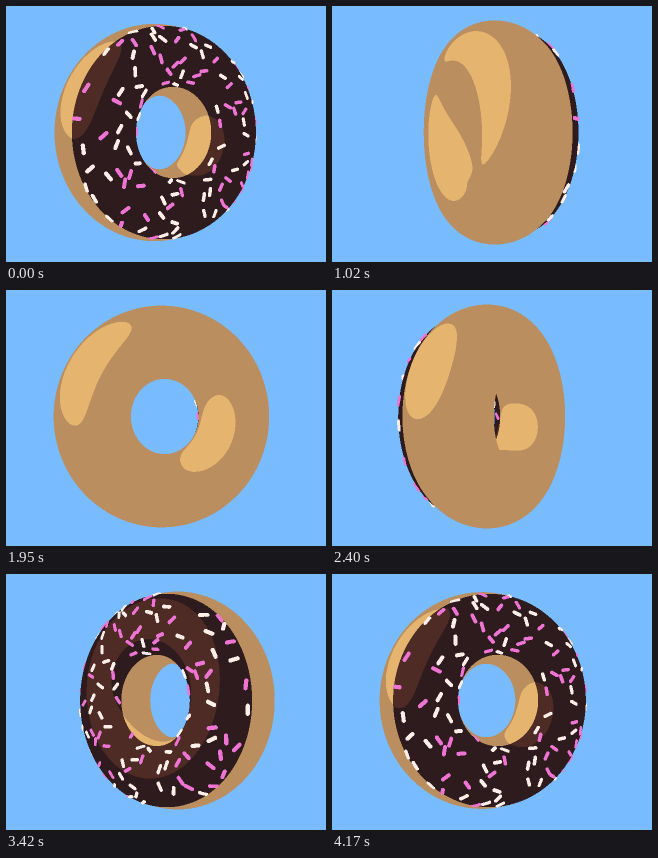
An HTML page with a canvas that plays this animation: 320 px wide and 256 px high, repeating every 4.23 s.

```html
<!DOCTYPE html>
<html lang="en">
<head>
<meta charset="utf-8">
<title>Spinning donut</title>
<style>
  html, body { margin: 0; width: 100%; height: 100%; overflow: hidden; background: #78bcff; }
  canvas { display: block; width: 320px; height: 256px; }
</style>
</head>
<body>
<canvas id="stage" width="320" height="256"></canvas>
<script>
const W = 320, H = 256, SS = 2;
const LOOP = 4230, STEP = 30, LAST_STEP = 139;
const CX = 159.5, CY = 126.5, DIST = 375;
const START = 31.5 * Math.PI / 180;

// Ring radius, dough cross-section, and the icing cap sitting on it.
const RING = 72.3, MID = -5;
const DOUGH = { r: 35, h: 40, base: 0 };
const ICING = { r: 28.6, h: 18.5, base: 23 };

// A nearby lamp, up and to the left; surfaces facing it closely enough are lit.
const LAMP = { x: -125, y: -95, z: 195 }, LIT = 0.775;

const rgb = (r, g, b) => ((255 << 24) | (b << 16) | (g << 8) | r) >>> 0;
const SKY = rgb(120, 188, 255);
const DOUGH_COLORS = [rgb(186, 142, 94), rgb(229, 181, 111)];
const ICING_COLORS = [rgb(46, 27, 29), rgb(78, 44, 37)];
const WHITE = rgb(255, 238, 231), PINK = rgb(238, 116, 212);

const BW = W * SS, BH = H * SS;
const buffer = document.createElement('canvas');
buffer.width = BW;
buffer.height = BH;
const bufferCtx = buffer.getContext('2d');
const image = bufferCtx.createImageData(BW, BH);
const pixels = new Uint32Array(image.data.buffer);
const near = new Float32Array(BW * BH);
const ctx = document.getElementById('stage').getContext('2d');

// Point on a ring-shaped surface: p runs round the ring, a round the cross-section.
function surface(shape, p, a) {
  const off = shape.r * Math.cos(a), rise = shape.base + shape.h * Math.sin(a);
  const rad = RING + off;
  const nr = off / DOUGH.r ** 2, nw = rise / DOUGH.h ** 2, len = Math.hypot(nr, nw);
  return {
    u: rad * Math.cos(p), v: rad * Math.sin(p), w: MID + rise,
    nu: nr / len * Math.cos(p), nv: nr / len * Math.sin(p), nw: nw / len, rad
  };
}

function makeStrip(shape, from, to, cols, colors) {
  const rows = 140, points = [];
  for (let i = 0; i <= rows; i++) {
    for (let j = 0; j <= cols; j++) {
      points.push(surface(shape, i / rows * 2 * Math.PI, from + (to - from) * j / cols));
    }
  }
  return { rows, cols, points, colors };
}

const lip = Math.asin(ICING.base / DOUGH.h);
const strips = [
  makeStrip(DOUGH, Math.PI - lip, 2 * Math.PI + lip, 44, DOUGH_COLORS),
  makeStrip(ICING, 0, Math.PI, 32, ICING_COLORS)
];

function seeded(seed) {
  return () => {
    seed = (seed + 0x6d2b79f5) | 0;
    let t = Math.imul(seed ^ (seed >>> 15), 1 | seed);
    t = (t + Math.imul(t ^ (t >>> 7), 61 | t)) ^ t;
    return ((t ^ (t >>> 14)) >>> 0) / 4294967296;
  };
}

// Scatters sprinkles evenly over the icing, each lying flat at a random slant.
function scatter(count, gap, half) {
  const random = seeded(7), list = [];
  while (list.length < count) {
    const p = random() * 2 * Math.PI, a = 0.1 + random() * (Math.PI - 0.2);
    const slant = random() * Math.PI, keep = random(), tint = random();
    const o = surface(ICING, p, a);
    const crowded = list.some(({ o: q }) => Math.hypot(o.u - q.u, o.v - q.v, o.w - q.w) < gap);
    if (crowded || keep > o.rad / (RING + ICING.r)) continue;
    const dp = half * Math.cos(slant) / o.rad;
    const da = half * Math.sin(slant) / Math.hypot(ICING.r * Math.sin(a), ICING.h * Math.cos(a));
    list.push({
      o,
      color: tint < 0.53 ? WHITE : PINK,
      ends: [surface(ICING, p - dp, a - da), surface(ICING, p + dp, a + da)]
    });
  }
  return list;
}
const sprinkles = scatter(112, 8, 3.1);

function triangle(a, b, c, colors) {
  const area = (b.x - a.x) * (c.y - a.y) - (b.y - a.y) * (c.x - a.x);
  if (Math.abs(area) < 1e-6) return;
  const x0 = Math.max(0, Math.ceil(Math.min(a.x, b.x, c.x)));
  const x1 = Math.min(BW - 1, Math.floor(Math.max(a.x, b.x, c.x)));
  const y0 = Math.max(0, Math.ceil(Math.min(a.y, b.y, c.y)));
  const y1 = Math.min(BH - 1, Math.floor(Math.max(a.y, b.y, c.y)));
  for (let y = y0; y <= y1; y++) {
    for (let x = x0; x <= x1; x++) {
      const q = ((x - a.x) * (c.y - a.y) - (y - a.y) * (c.x - a.x)) / area;
      const r = ((b.x - a.x) * (y - a.y) - (b.y - a.y) * (x - a.x)) / area;
      const p = 1 - q - r;
      if (p < -1e-5 || q < -1e-5 || r < -1e-5) continue;
      const k = p * a.k + q * b.k + r * c.k, at = y * BW + x;
      if (k <= near[at]) continue;
      near[at] = k;
      pixels[at] = colors[p * a.shade + q * b.shade + r * c.shade > LIT ? 1 : 0];
    }
  }
}

function ball({ x, y, z }, radius, color) {
  const k = DIST / (DIST - z), r = radius * k * SS;
  const cx = (CX + x * k) * SS - 0.5, cy = (CY + y * k) * SS - 0.5;
  for (let py = Math.ceil(cy - r); py <= cy + r; py++) {
    for (let px = Math.ceil(cx - r); px <= cx + r; px++) {
      const d = (px - cx) ** 2 + (py - cy) ** 2;
      if (d > r * r) continue;
      const lift = Math.sqrt(r * r - d) / (k * SS);
      const depth = DIST / (DIST - z - lift), at = py * BW + px;
      if (depth <= near[at]) continue;
      near[at] = depth;
      pixels[at] = color;
    }
  }
}

function render(angle) {
  const c = Math.cos(angle), s = Math.sin(angle);
  const turn = (u, v, w) => ({ x: u * c + w * s, y: v, z: w * c - u * s });
  pixels.fill(SKY);
  near.fill(0);

  for (const { rows, cols, points, colors } of strips) {
    const seen = points.map(o => {
      const { x, y, z } = turn(o.u, o.v, o.w), n = turn(o.nu, o.nv, o.nw);
      const lx = LAMP.x - x, ly = LAMP.y - y, lz = LAMP.z - z;
      const k = DIST / (DIST - z);
      return {
        x: (CX + x * k) * SS - 0.5,
        y: (CY + y * k) * SS - 0.5,
        k,
        shade: (n.x * lx + n.y * ly + n.z * lz) / Math.hypot(lx, ly, lz)
      };
    });
    for (let i = 0; i < rows; i++) {
      for (let j = 0; j < cols; j++) {
        const n = i * (cols + 1) + j, m = n + cols + 1;
        triangle(seen[n], seen[n + 1], seen[m], colors);
        triangle(seen[n + 1], seen[m + 1], seen[m], colors);
      }
    }
  }

  for (const { color, ends: [a, b] } of sprinkles) {
    for (let t = 0; t <= 1; t += 0.125) {
      const mix = key => a[key] + (b[key] - a[key]) * t;
      ball(turn(mix('u'), mix('v'), mix('w')), 1.75, color);
    }
  }

  bufferCtx.putImageData(image, 0, 0);
  ctx.drawImage(buffer, 0, 0, W, H);
}

const began = performance.now();
let shown = -1;
function tick() {
  const time = (performance.now() - began) % LOOP;
  const step = Math.min(LAST_STEP, Math.floor(time / STEP));
  if (step !== shown) {
    shown = step;
    render(START + step * STEP / LOOP * 2 * Math.PI);
  }
  requestAnimationFrame(tick);
}
tick();
</script>
</body>
</html>
```
